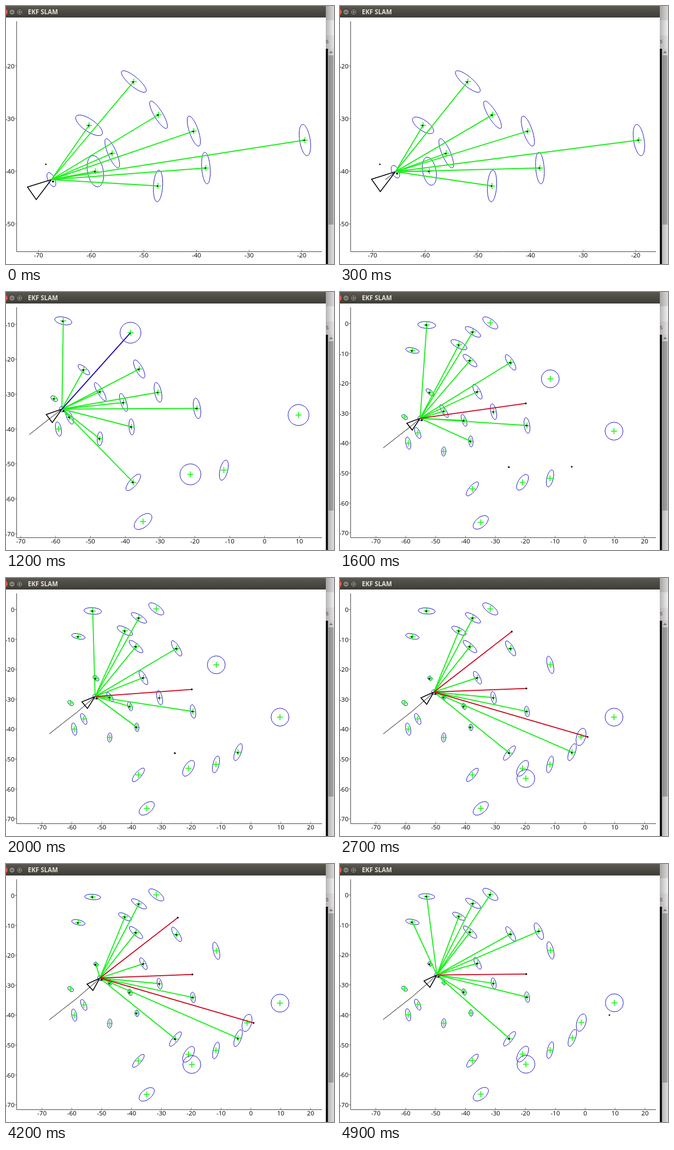
Animation, 600 px wide and 471 px high, one loop 5000 ms. Source, as an HTML page with a canvas:

```html
<!DOCTYPE html>
<html lang="en">
<head>
<meta charset="utf-8">
<title>EKF SLAM</title>
<style>
html, body { margin: 0; width: 100%; height: 100%; overflow: hidden; background: #fff; }
canvas { display: block; }
</style>
</head>
<body>
<canvas id="stage" width="600" height="471"></canvas>
<script>
const g = document.getElementById('stage').getContext('2d');
const LOOP = 5000, STEP = 100, TAU = Math.PI * 2;
const FONT = '"Open Sans", "Noto Sans", sans-serif';

// start time, pixels per unit, pixel of x = 0, pixel of y = 0, shift of the y labels
const views = [
  [0, 9.63, 733.6, -83.6, 0],
  [500, 6.44, 475.5, 2.9, 5],
  [1000, 6.37, 473, -4.7, 0],
  [1600, 5.46, 448, 57.5, 0],
  [4600, 5.47, 448.5, 56.5, 0]
];

// time, x, y
const path = [
  [0, -67.56, -41.6], [700, -63.1, -38.1], [1200, -58.2, -34.3], [2000, -52.2, -29.1],
  [2500, -50.6, -27.6], [4600, -50.6, -27.6], [4900, -49.6, -26.7]
];

// birth time, then landmarks: x, y, first minor radius, last major radius, shrink from, shrink to
const groups = [
  [0, {
    A: [-51.9, -23, .9, .8, 400, 2350],
    B: [-60.4, -31.3, 1.15, 1.1, 0, 900],
    C: [-47.2, -29.3, .8, .7, 1300, 2650],
    D: [-56, -36.6, .8, 2, 700, 1300],
    E: [-59.2, -40, 1.5, 2.1, 0, 900],
    F: [-40.5, -32.4, .85, 1.1, 1000, 2300],
    G: [-47.3, -42.8, .87, 1.55, 500, 1500],
    H: [-38.2, -39.4, .8, 1.1, 600, 2300],
    I: [-19.4, -34.1, 1, 1.8, 1200, 2600]
  }],
  [500, { J: [-57.8, -9, 1.6, 2.3, 500, 1500], M: [-11.7, -51.8, 1.2, 2.9] }],
  [1000, {
    O: [-36, -22.8, 1, 2.2], P: [-30.6, -29.5, 1, 1.85],
    Q: [-37.7, -55.3, 1.1, 2.8], R: [-34.9, -66.5, 1.65, 3]
  }],
  [1400, { N: [-38.5, -12.4, .95, 2.9] }],
  [1600, {
    L: [-20.9, -53.1, 1.45, 3], S: [-53, -.5, 1.15, 2.7], T: [-37.5, -2.8, 1, 2.9],
    U: [-31.7, .2, 1.25, 3], V: [-42.2, -7.1, 1.1, 2.4], W: [-24.9, -13, 1, 2.8]
  }],
  [1900, { Y: [-4.3, -47.7, 1.05, 3] }],
  [2300, { X: [-11.6, -18.5, 1, 3] }],
  [2700, { Z: [-1.3, -42.6, 1.5, 3], a: [-25.3, -48, .95, 3] }],
  [4600, { c: [-15.5, -12.1, 1.1, 3] }]
];
const marks = Object.assign({}, ...groups.map(([, set]) => set));

// landmarks seen once: x, y, from, to
const circles = [
  [9.75, -36, 500, LOOP], [-21.3, -53, 500, 1600], [-38.5, -12.4, 1000, 1400],
  [-11.6, -18.5, 1600, 2300], [-19.8, -56.5, 2700, LOOP]
];

const sights = [
  { t: 0, green: 'ABCDEFGHI', dots: [[-68.6, -38.7]] },
  { t: 500, green: 'ABCDEFGHI', red: [[-26.3, -65.7]], seen: 'JOP' },
  { t: 1000, green: 'JAOPCFIHGQD', blue: [[-38.5, -12.4]], seen: 'B' },
  { t: 1600, green: 'SVTNWOIHFC', red: [[-19.8, -26.7]], seen: 'AJPaY' },
  { t: 2700, green: 'VTNOPIaY', red: [[-24.5, -7.4], [-19.6, -26.4], [.9, -42.6]], seen: 'ACFHJSW' },
  { t: 3800, green: 'VTNOPIaYA', red: [[-24.5, -7.4], [-19.6, -26.4], [.9, -42.6]], seen: 'CFHJSW' },
  { t: 4600, green: 'JSVTUNWcOPIFa', red: [[-19.7, -26.4]], seen: 'A', dots: [[8.1, -40.1]] }
];

const lerp = (a, b, p) => a + (b - a) * p;
const span = (t, a, b) => Math.min(1, Math.max(0, (t - a) / (b - a)));
const rand = n => { const s = Math.sin(n * 12.9898) * 43758.5453; return s - Math.floor(s); };

function robotAt(t) {
  const i = Math.max(1, path.findIndex(p => p[0] >= t));
  const [a, b] = [path[i - 1], path[i]], p = span(t, a[0], b[0]);
  return [lerp(a[1], b[1], p), lerp(a[2], b[2], p)];
}

function box(color, x, y, w, h) {
  g.fillStyle = color;
  g.fillRect(x, y, w, h);
}

function line(color, width, points, closed) {
  g.strokeStyle = color;
  g.lineWidth = width;
  g.beginPath();
  points.forEach(p => g.lineTo(...p));
  if (closed) g.closePath();
  g.stroke();
}

function disc(color, x, y, r) {
  g.fillStyle = color;
  g.beginPath();
  g.arc(x, y, r, 0, TAU);
  g.fill();
}

function oval(x, y, a, b, angle) {
  g.strokeStyle = '#1c14c4';
  g.lineWidth = 1;
  g.beginPath();
  g.ellipse(x, y, a, b, angle, 0, TAU);
  g.stroke();
}

function cross(x, y) {
  line('#18f518', 1.6, [[x - 5.5, y], [x + 5.5, y]]);
  line('#18f518', 1.6, [[x, y - 5.5], [x, y + 5.5]]);
}

function text(str, x, y, align, color, font) {
  g.font = font + ' ' + FONT;
  g.textAlign = align;
  g.textBaseline = 'alphabetic';
  g.fillStyle = color;
  g.fillText(str, x, y);
}

function gradient(x, y, from, to) {
  const fill = g.createLinearGradient(x ? 585 : 0, 0, x, y);
  fill.addColorStop(0, from);
  fill.addColorStop(1, to);
  return fill;
}

function frameWindow() {
  box('#fff', 0, 0, 600, 471);
  box(gradient(0, 21, '#5a5850', '#3d3c37'), 0, 0, 585, 21);
  disc('#e8593a', -3, 11, 6);
  for (const x of [11, 25]) {
    disc('#35342f', x, 11, 6);
    disc('#85827a', x, 11, 5);
  }
  line('#3d3c37', 1, [[8.5, 11.5], [13.5, 11.5]]);
  g.strokeRect(22.5, 8.5, 5, 5);
  text('EKF SLAM', 40, 15, 'left', '#e4e0d8', 'bold 11.5px');

  // window behind
  box('#dcdad9', 585, 0, 15, 26);
  box('#f3f1f1', 585, 26, 15, 28);
  box('#e8e6e5', 585, 54, 15, 24);
  text('s', 585, 68, 'left', '#555', '11px');
  box('#e0dedd', 589, 78, 11, 393);
  box('#a9a7a6', 590, 90, 9, 309);
  box(gradient(600, 0, 'rgba(0,0,0,.25)', 'rgba(0,0,0,0)'), 585, 0, 15, 471);
  box('#111', 585, 78, 4, 393);
  g.fillStyle = '#777';
  g.beginPath();
  g.moveTo(591, 86);
  g.lineTo(594.5, 82);
  g.lineTo(598, 86);
  g.fill();
}

function axes([, k, x0, y0, shift]) {
  line('#444', 1, [[19.5, 28], [19.5, 448.5], [578, 448.5]]);
  for (let v = -90; v <= 30; v += 10) {
    const x = x0 + v * k, y = y0 - (v - shift) * k;
    if (x > 24 && x < 578) {
      line('#777', 1, [[x, 448], [x, 445]]);
      text(v, x, 459, 'center', '#000', '500 11.5px');
    }
    if (y > 30 && y < 446) {
      line('#777', 1, [[19, y], [16, y]]);
      text(v, 15.5, y + 4.5, 'right', '#000', '500 11.5px');
    }
  }
}

function draw(t) {
  const current = list => list.filter(e => (e.t ?? e[0]) <= t).pop();
  const view = current(views), sight = current(sights);
  const [, k, x0, y0] = view;
  const at = ([x, y]) => [x0 + x * k, y0 - y * k];
  const pose = robotAt(t), [rx, ry] = at(pose);

  frameWindow();
  axes(view);
  g.save();
  g.beginPath();
  g.rect(20, 21, 565, 427);
  g.clip();

  // trail and robot
  line('#111', 1, [...path.filter(p => p[0] < t).map(p => at(p.slice(1))), [rx, ry]]);
  const heading = lerp(35, 43, span(t, 700, 3000)) * Math.PI / 180;
  const corner = d => at([pose[0] - 4.75 * Math.cos(heading + d), pose[1] - 4.75 * Math.sin(heading + d)]);
  line('#000', 1.6, [[rx, ry], corner(.31), corner(-.31)], true);
  const calm = span(t, 0, 1200);
  oval(rx, ry, lerp(1.45, .8, calm) * k, lerp(.65, .7, calm) * k, 1.13);

  // landmarks, stretched across the direction of first sight
  for (const [born, set] of groups) {
    if (t < born) continue;
    const from = robotAt(born);
    for (const [x, y, b0, a1, t0 = born, t1 = born + 2200] of Object.values(set)) {
      const p = span(t, t0, t1), b1 = a1 === 3 ? b0 : .45 + .17 * a1;
      const angle = Math.atan2(x - from[0], y - from[1]);
      oval(...at([x, y]), lerp(3, a1, p) * k, lerp(b0, b1, p) * k, angle);
      cross(...at([x, y]));
    }
  }
  for (const [x, y, from, to] of circles) {
    if (t < from || t >= to) continue;
    oval(...at([x, y]), 3 * k, 3 * k, 0);
    cross(...at([x, y]));
  }

  // sensor readings
  const dot = ([x, y], r = 1.6) => disc('#000', x, y, r);
  for (const id of sight.green) line('#18f018', 1.9, [[rx, ry], at(marks[id])]);
  for (const p of sight.red || []) {
    line('#cc0018', 1.8, [[rx, ry], at(p)]);
    dot(at(p));
  }
  for (const p of sight.blue || []) line('#1800b4', 1.8, [[rx, ry], at(p)]);
  for (const id of sight.green + (sight.seen || '')) {
    const [x, y] = at(marks[id]), n = id.charCodeAt(0);
    dot([x - 1.5 + rand(n), y + rand(n + 1) * 1.5], 1.4);
    if (t >= 700) dot([x - 1 + 2 * rand(n + 2), y + 1.5 * rand(n + 3)], 1.1);
  }
  (sight.dots || []).forEach(p => dot(at(p), 1.4));
  dot([rx + 3, ry + 3.5], 1.8);
  g.restore();
}

function tick(now) {
  draw(Math.floor(now % LOOP / STEP) * STEP);
  requestAnimationFrame(tick);
}
tick(0);
</script>
</body>
</html>
```
